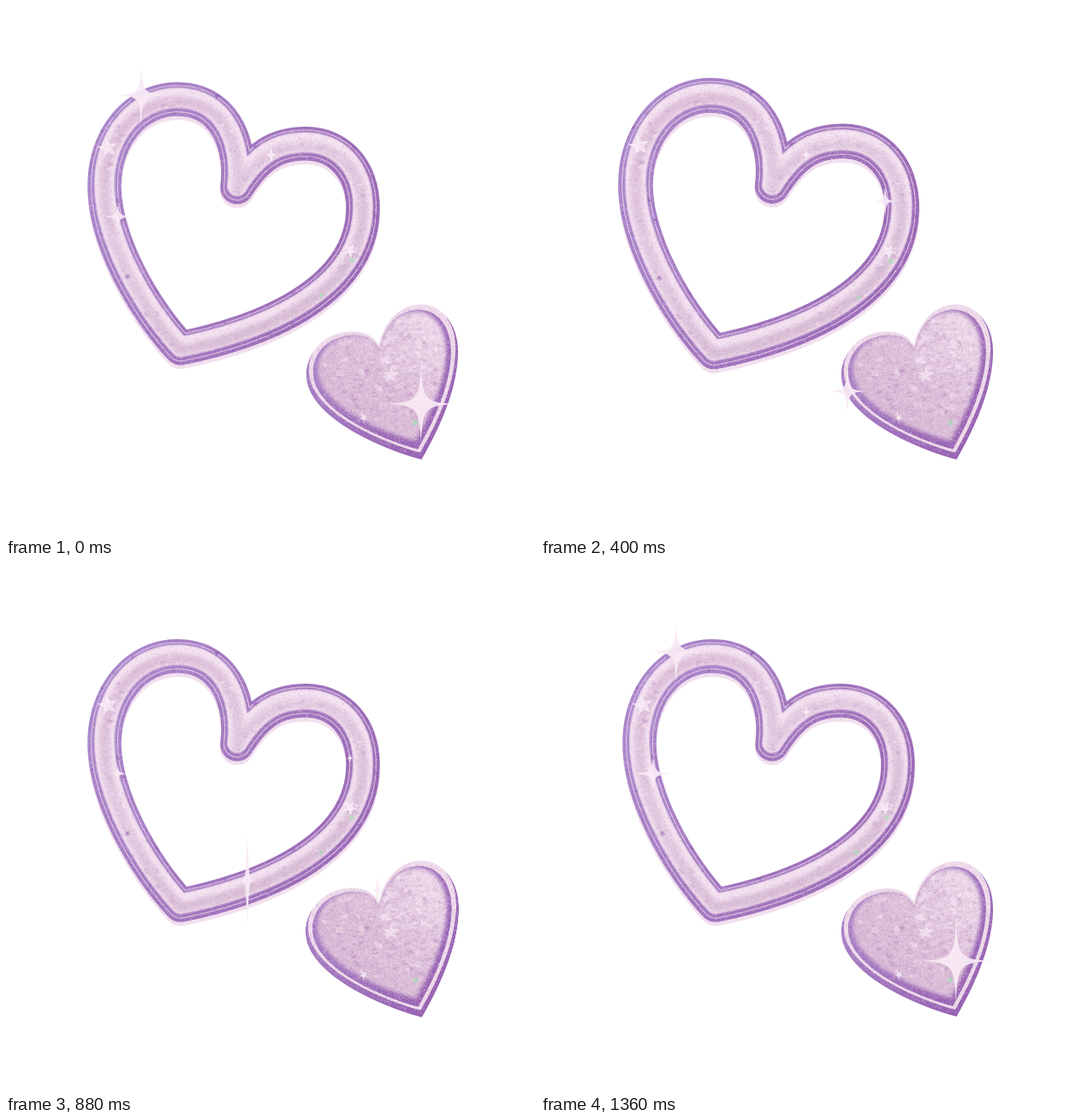
These frames come from a looping animation (618x618 px, 1400 ms). An HTML page with a canvas:

```html
<!DOCTYPE html>
<html lang="en">
<head>
<meta charset="utf-8">
<title>Glitter hearts</title>
<style>
html, body { margin: 0; width: 100%; height: 100%; overflow: hidden; background: #fff; }
canvas { display: block; width: 618px; height: 618px; }
</style>
</head>
<body>
<canvas id="stage" width="618" height="618"></canvas>
<script>
const SIZE = 618, LOOP = 1400, STEP = 40, RES = 2;
const PALE = '#f4e2f1';
const ctx = document.getElementById('stage').getContext('2d');

const ring = new Path2D('M270 214C276 168 258 111 200 111C152 111 115 155 115 212' +
  'C115 275 160 355 204 402C290 385 417 340 417 238C417 192 388 163 350 163' +
  'C316 163 293 177 270 214Z');
const solid = new Path2D('M436 403C440 372 460 349 487 349C512 349 529 372 529 402' +
  'C529 450 503 500 486 530C440 518 350 480 350 430C350 400 376 382 403 382' +
  'C420 382 432 390 436 403Z');

let seed = 7;
function rnd() {
  seed = (seed * 16807) % 2147483647;
  return seed / 2147483647;
}
const range = (a, b) => a + (b - a) * rnd();
const pick = list => list[Math.floor(rnd() * list.length)];

function layer(draw) {
  const c = document.createElement('canvas');
  c.width = c.height = SIZE * RES;
  const g = c.getContext('2d');
  g.scale(RES, RES);
  g.lineJoin = 'round';
  draw(g);
  return c;
}
const paste = (g, c) => g.drawImage(c, 0, 0, SIZE, SIZE);

function gradient(g, x0, y0, x1, y1, colors) {
  const fill = g.createLinearGradient(x0, y0, x1, y1);
  colors.forEach((c, i) => fill.addColorStop(i / (colors.length - 1), c));
  return fill;
}

function strokeRing(g, width, dy, color, blur = 0) {
  g.save();
  g.translate(0, dy);
  if (blur) g.filter = `blur(${blur}px)`;
  g.lineWidth = width;
  g.strokeStyle = color;
  g.stroke(ring);
  g.restore();
}

function fillSolid(g, scale, dy, color, blur = 0) {
  g.save();
  g.translate(438, 437 + dy);
  g.scale(scale, scale);
  g.translate(-438, -437);
  if (blur) g.filter = `blur(${blur}px)`;
  g.fillStyle = color;
  g.fill(solid);
  g.restore();
}

// Irregular angular chips scattered over a box.
function flakes(g, box, count, size, colors, alpha) {
  const [x0, y0, x1, y1] = box;
  for (let i = 0; i < count; i++) {
    const x = range(x0, x1), y = range(y0, y1), r = range(1, size);
    g.globalAlpha = alpha * range(0.4, 1);
    g.fillStyle = pick(colors);
    g.beginPath();
    for (let k = 0; k < 5; k++) {
      const a = k * 1.257 + range(0, 0.9), d = r * range(0.35, 1.2);
      g.lineTo(x + Math.cos(a) * d * 1.25, y + Math.sin(a) * d * 0.85);
    }
    g.fill();
  }
  g.globalAlpha = 1;
}

function grain(g, box, count) {
  for (let i = 0; i < count; i++) {
    g.fillStyle = rnd() < 0.5 ? 'rgba(255,246,252,.28)' : 'rgba(150,95,150,.16)';
    g.fillRect(range(box[0], box[2]), range(box[1], box[3]), 1, 1);
  }
}

function star(g, x, y, r, color, turn) {
  g.fillStyle = color;
  g.beginPath();
  for (let k = 0; k < 10; k++) {
    const a = turn + k * Math.PI / 5, d = k % 2 ? r * 0.42 : r;
    g.lineTo(x + Math.cos(a) * d, y + Math.sin(a) * d);
  }
  g.fill();
}

function masked(draw, mask) {
  return layer(g => {
    draw(g);
    g.globalCompositeOperation = 'destination-in';
    mask(g);
  });
}

const ringBox = [90, 86, 442, 426], solidBox = [348, 346, 532, 532];
const bodyChips = ['#f8e8f5', '#f2dcef', '#d0abd0', '#d9bbd6', '#e6cbe2', '#c79fca'];
const darkChips = ['#8656a4', '#9367af', '#b597d6', '#a67dc2'];

const bigHeart = layer(g => {
  const purple = gradient(g, 95, 200, 420, 330, ['#aa86cb', '#a276bf', '#9a68b6']);
  strokeRing(g, 39.5, 2.4, '#f2e0ef');
  strokeRing(g, 39.5, -2.2, purple);
  strokeRing(g, 32, -2.6, 'rgba(240,218,240,.7)');
  strokeRing(g, 29.5, -2.6, purple);
  paste(g, masked(m => flakes(m, ringBox, 700, 4, darkChips, 0.6),
    m => strokeRing(m, 39, -2.2, '#000')));
  strokeRing(g, 23.5, -3.8, PALE, 1.6);
  strokeRing(g, 12, 0.6, gradient(g, 150, 100, 330, 400, ['#ddbfd9', '#e3cbe1', '#d7bbd4']), 4);
  paste(g, masked(m => flakes(m, ringBox, 1900, 4.4, bodyChips, 0.55),
    m => strokeRing(m, 15, -0.5, '#000', 2)));
  star(g, 119, 166, 12, '#f8eaf5', -0.5);
  star(g, 402, 286, 9, '#f8eaf5', 0.2);
  star(g, 142, 316, 4, '#b58bc2', 0.3);
  star(g, 404, 297, 4, '#b3dcbd', 0.4);
  star(g, 368, 338, 3.5, '#a9d6b8', 0.1);
  paste(g, masked(m => grain(m, ringBox, 26000), m => strokeRing(m, 40, 0, '#000')));
});

const smallHeart = layer(g => {
  const purple = gradient(g, 360, 400, 520, 500, ['#a97fc6', '#a072bd', '#9761b3']);
  fillSolid(g, 0.99, 0.8, purple);
  paste(g, masked(m => flakes(m, solidBox, 250, 4, darkChips, 0.5),
    m => fillSolid(m, 0.99, 0.8, '#000')));
  fillSolid(g, 0.957, -4.3, '#f0dcec');
  fillSolid(g, 0.9, -3, purple);
  fillSolid(g, 0.835, -6.5, gradient(g, 390, 470, 500, 370, ['#d9bad6', '#dfc3db', '#ecd6e8']), 4);
  paste(g, masked(m => {
    flakes(m, solidBox, 900, 5.5, bodyChips, 0.5);
    flakes(m, [440, 350, 530, 425], 160, 6, ['#f8e9f5', '#f3deef'], 0.6);
    flakes(m, [385, 420, 505, 480], 50, 5, ['#bd90c3', '#c39cc9'], 0.6);
  }, m => fillSolid(m, 0.81, -6.5, '#000', 5)));
  star(g, 450, 431, 10, '#f3e1f0', -0.3);
  star(g, 418, 481, 5, '#f6e8f3', 0.4);
  star(g, 478, 487, 4.5, '#a9d9b8', 0.2);
  paste(g, masked(m => grain(m, solidBox, 14000), m => fillSolid(m, 0.98, -1, '#000')));
});

// Sparkles: x, y, horizontal and vertical reach, time of full size.
const sparkles = [
  [158, 104, 28, 34, 1345],
  [131, 246, 42, 36, 1163],
  [310, 174, 13, 14, 180],
  [485, 465, 41, 47, 1345],
  [358, 450, 20, 25, 365],
  [402, 228, 20, 28, 580],
  [282, 371, 9, 58, 960],
  [434, 383, 6, 23, 740]
];

// Smooth swell from 0 to 1 and back around a peak, wrapping over the loop.
function swell(t, peak, half) {
  let d = Math.abs(t - peak);
  d = Math.min(d, LOOP - d);
  return d < half ? Math.cos(d / half * Math.PI / 2) ** 2 : 0;
}

function drawHeart(img, cx, cy, scale) {
  ctx.save();
  ctx.translate(cx, cy);
  ctx.scale(scale, scale);
  ctx.drawImage(img, -cx, -cy, SIZE, SIZE);
  ctx.restore();
}

function drawSparkle(x, y, rx, ry, s) {
  const w = 2.6 * Math.min(1, 0.35 + s * 0.65);
  rx *= s;
  ry *= s;
  ctx.save();
  ctx.translate(x, y);
  ctx.beginPath();
  ctx.moveTo(0, -ry);
  ctx.bezierCurveTo(w, -ry * 0.1, rx * 0.1, -w, rx, 0);
  ctx.bezierCurveTo(rx * 0.1, w, w, ry * 0.1, 0, ry);
  ctx.bezierCurveTo(-w, ry * 0.1, -rx * 0.1, w, -rx, 0);
  ctx.bezierCurveTo(-rx * 0.1, -w, -w, -ry * 0.1, 0, -ry);
  ctx.fillStyle = 'rgba(249,235,246,.92)';
  ctx.fill();
  ctx.restore();
}

function render(now) {
  const t = Math.floor((now % LOOP) / STEP) * STEP;
  ctx.fillStyle = '#fff';
  ctx.fillRect(0, 0, SIZE, SIZE);
  drawHeart(bigHeart, 266, 257, 1 + 0.049 * swell(t, 280, 280));
  drawHeart(smallHeart, 440, 440, 1 + 0.049 * swell(t, 1080, 280));
  for (const [x, y, rx, ry, peak] of sparkles) {
    const s = swell(t, peak, 420);
    if (s > 0.08) drawSparkle(x, y, rx, ry, s);
  }
}

const start = performance.now();
function tick() {
  render(performance.now() - start);
  requestAnimationFrame(tick);
}
tick();
</script>
</body>
</html>
```
